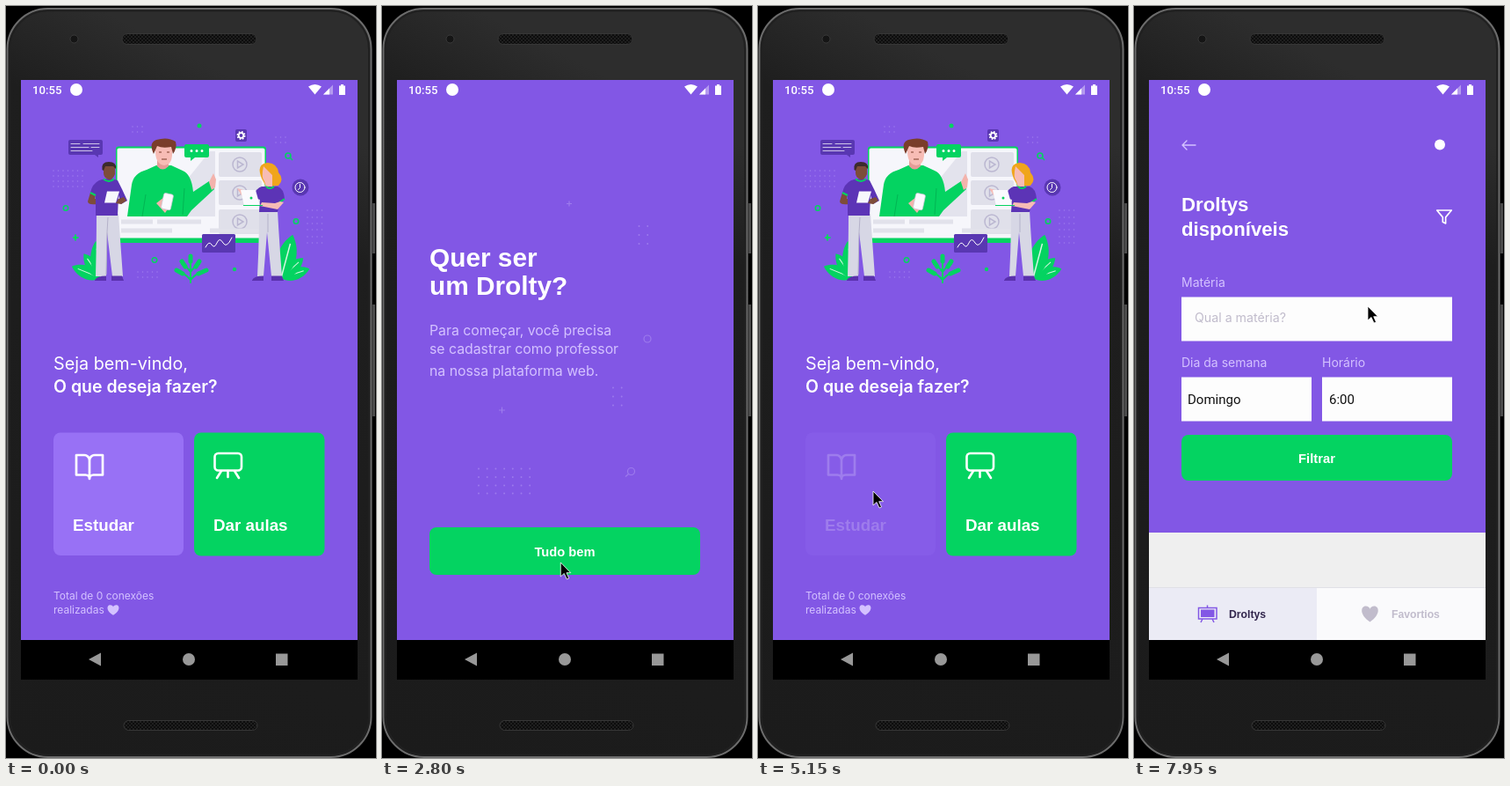
An HTML page that plays this animation: 421 px wide and 854 px high, repeating every 8 s.

```html
<!DOCTYPE html>
<html lang="pt-BR">
<head>
<meta charset="utf-8">
<title>App de aulas</title>
<style>
  html, body { margin: 0; width: 100%; height: 100%; overflow: hidden; background: #000; }
  svg { display: block; width: 421px; height: 854px; }
  text { fill: #fff; white-space: pre; }
  .pop { font-family: Inter, sans-serif; }
  .arc { font-family: "Liberation Sans", Arial, sans-serif; font-weight: 700; }
  .rob { font-family: Roboto, sans-serif; }
  .soft { fill: #d4c2ff; }
  .line { fill: none; stroke: #fff; stroke-linecap: round; stroke-linejoin: round; }
  .dots { fill: none; stroke: #9d7bed; stroke-width: 1.5; stroke-linecap: round; stroke-dasharray: 0 5.5; }
  .ring { fill: none; stroke: #04d361; stroke-width: 1.6; }
</style>
</head>
<body>
<svg viewBox="0 0 421 854">
  <defs>
    <linearGradient id="body" x1="0" y1="1" x2=".25" y2="0">
      <stop offset="0" stop-color="#1b1b1b"/><stop offset=".85" stop-color="#1e1e1e"/><stop offset="1" stop-color="#2d2d2d"/>
    </linearGradient>
    <pattern id="mesh" width="4" height="4" patternUnits="userSpaceOnUse">
      <rect width="4" height="4" fill="#0d0d0d"/><path d="M0 0h2v2h2v2h-2v-2h-2z" fill="#1f1f1f"/>
    </pattern>
    <clipPath id="stage"><rect x="17" y="106" width="383" height="614"/></clipPath>
    <clipPath id="reveal"><rect id="edge" x="17" y="106" width="383" height="614"/></clipPath>
    <g id="leaf">
      <path d="M0 0C-10-8-9-24 0-34C9-24 10-8 0 0Z" fill="#04d361"/>
      <path d="M0 0V-27" stroke="#d5f8e2" fill="none"/>
    </g>
    <g id="play">
      <rect width="49" height="28" rx="2" fill="#e0e0ea"/>
      <g fill="none" stroke="#bbb7d1" stroke-width="1.500"><circle cx="24" cy="14" r="8"/><path d="M21.500 10v8l6.500-4z"/></g>
    </g>
    <path id="heart" d="M0 9C-13 0-10-9-5-9C-2-9 0-7 0-5.500C0-7 2-9 5-9C10-9 13 0 0 9Z"/>
  </defs>

  <!-- phone -->
  <path d="M418.500 224v57M418.500 339v127" stroke="#4b4b4b" stroke-width="3"/>
  <rect x="1.500" y="3" width="414" height="850" rx="46" fill="url(#body)" stroke="#6c6c6c" stroke-width="2"/>
  <rect x="4" y="5.500" width="409" height="845" rx="43.500" fill="none" stroke="#202020" stroke-width="2"/>
  <circle cx="77.500" cy="37.500" r="4.500" fill="#151515" stroke="#3a3a3a"/>
  <g fill="url(#mesh)" stroke="#363636">
    <rect x="132" y="31.500" width="153" height="12" rx="6"/><rect x="134" y="811.500" width="152" height="11" rx="5.500"/>
  </g>
  <rect x="17" y="84" width="383" height="636" fill="#8257e5"/>
  <rect x="17" y="720" width="383" height="45"/>
  <g fill="#989898"><path d="M94 742l14-7.500v15z"/><circle cx="208" cy="742" r="7"/><rect x="307" y="735.500" width="13.500" height="13.500"/></g>

  <g clip-path="url(#stage)">
    <!-- home -->
    <g id="home">
      <path class="dots" d="M54 187h34M54 193h34M54 199h34M54 205h34M144 137h15M144 143h15M307 149h15M307 155h15M343 232h20M343 240h20M343 247h20M343 254h20M343 262h20M343 269h20M150 302h26M150 308h26"/>
      <g fill="#04d361"><circle cx="220" cy="136" r="2.500"/><circle cx="260" cy="299" r="2.200"/><path d="M76 262h2v-2.500h2v2.500h2.500v2h-2.500v2.500h-2v-2.500h-2z"/></g>
      <g class="ring"><circle cx="68" cy="229.500" r="2.700"/><circle cx="169" cy="288.500" r="2.700"/><circle cx="330" cy="244.500" r="2.700"/><circle cx="321" cy="170" r="3"/><path d="M323 172l3 3"/></g>
      <use href="#leaf" transform="translate(108 309) rotate(-68) scale(1.050)"/>
      <use href="#leaf" transform="translate(108 309) rotate(-35)"/>
      <use href="#leaf" transform="translate(108 309) rotate(-8) scale(1.250)"/>
      <use href="#leaf" transform="translate(313 309) rotate(72)"/>
      <use href="#leaf" transform="translate(313 309) rotate(48)"/>
      <use href="#leaf" transform="translate(313 309) rotate(15) scale(1.500)"/>
      <g fill="none" stroke="#04d361" stroke-linecap="round">
        <path d="M210 314V285M210 311q-8-9-15-10M210 311q8-9 17-11M210 302q-6-8-10-9M210 302q6-8 10-9" stroke-width="2"/>
        <path d="M210 290V284M201 304l-7-4M219 304l9-4M204 296l-4-6M216 296l4-6" stroke-width="5"/>
      </g>
      <!-- monitor -->
      <rect x="125" y="159.500" width="171" height="109.500" rx="3" fill="#04d361"/>
      <rect x="126.500" y="161.500" width="168" height="102" rx="2" fill="#f6f6fb"/>
      <rect x="131" y="165" width="107" height="74" fill="#e3e3ed"/>
      <path d="M131 165h101l-60 74h-41z" fill="#f6f6fb"/>
      <use href="#play" x="242" y="166"/><use href="#play" x="242" y="198"/><use href="#play" x="242" y="231"/>
      <path d="M131 245h36M172 245h50M131 255h58M232 255h59" stroke="#e2e2eb" stroke-width="5"/>
      <!-- teacher -->
      <path d="M138 239L143 203Q145 190 160 186L171 181H188L201 187Q211 191 213 211L231 199L237 208L211 232L206 239Z" fill="#04d361"/>
      <path d="M155 239l4-25M203 207l-2 30" stroke="#02b553" fill="none"/>
      <path d="M231 200l5-10 3 7 -1 9-4 3z" fill="#f3b3ac"/>
      <path d="M172 172h13v10q-7 7-13 0z" fill="#e59c98"/>
      <path d="M170 157h19v13q-1 11-9 11q-9-1-10-14z" fill="#f7bcb5"/>
      <path d="M168 168Q162 155 171 152Q184 148 193 154Q195 161 190 168L188 160Q178 162 172 159Z" fill="#7a3d2a"/>
      <path d="M174 166h3M183 166h3M177 174h6" stroke="#7a3d2a"/>
      <path d="M171 224l9-7 8 8-7 10z" fill="#f3b3ac"/>
      <rect x="178" y="213" width="11" height="18" rx="2" fill="#fafafe" stroke="#c9c9d6" stroke-width=".7" transform="rotate(12 183 222)"/>
      <path d="M205 157h24q2 0 2 2v11q0 2-2 2h-14l-5 4v-4h-5q-2 0-2-2v-11q0-2 2-2z" fill="#04d361"/>
      <path d="M211 164.500h13" stroke="#fff" stroke-width="3" stroke-linecap="round" stroke-dasharray="0 6"/>
      <!-- boy -->
      <path d="M103 236h25q2 30 5 71h-12l-6-50-1 50h-12q1-36 1-71z" fill="#d7d7e5"/>
      <path d="M116 240l-1 17-1 48" stroke="#b4b1c9" fill="none"/>
      <path d="M101 311.500q2-5 13-5v5.500h-13zM120 306.500h12l2 5.500h-14z" fill="#5a31ad"/>
      <path d="M96 212l-3 10q1 6 19 1v-5l-11 1 1-5z" fill="#7d4c3a"/>
      <path d="M106 198Q117 194 127 198L132 208L138 221L131 225L128 215L127 238H102V216L96 212Q98 202 106 198Z" fill="#5c34b6"/>
      <path d="M111 196.500q6 5 12 0M96 212l6 3" stroke="#04d361" stroke-width="2" fill="none"/>
      <path d="M111 182h13v9q-3 7-7 6-6-2-6-7z" fill="#7d4c3a"/><path d="M109.500 186Q108 177 117 177Q126 177 125 185L122 182H113L111 187Z" fill="#3c2a2c"/>
      <path d="M131 225l-6-1 3-5 6-2 3 4z" fill="#7d4c3a"/>
      <path d="M115 210.500h14l-4 13h-13z" fill="#f7f7fc"/>
      <!-- girl -->
      <path d="M288 232h21q2 38 5 75h-12l-5-50-4 50h-7q2-35 2-75z" fill="#d7d7e5"/>
      <path d="M298 236v21" stroke="#b4b1c9"/>
      <path d="M280 311.500q2-5 13-5v5.500h-13zM302 306.500h12l2 5.500h-14z" fill="#5a31ad"/>
      <path d="M291 196q-7-17 7-18 11 1 12 11 7 8 0 15l-14 1z" fill="#f0a51c"/>
      <path d="M293 182q-3 13 1 17l2 7 7-1v-13z" fill="#f7bcb5"/>
      <path d="M291 205h18q7 2 8 14l-6 6-2 9h-21l1-14-8-3q4-11 10-12z" fill="#5c34b6"/>
      <path d="M296 205q4 4 9 0M311 223l6-4" stroke="#04d361" stroke-width="2" fill="none"/>
      <path d="M312 222l4 1-7 8-20-4 2-4 15 1z" fill="#f7bcb5"/><path d="M263 207l7 2 4 9-6-3z" fill="#f7bcb5"/>
      <path d="M267 209h17l5 18h-18z" fill="#fafafe"/><path d="M270 226.500h22" stroke="#04d361"/><circle cx="279" cy="218" r="1.500" fill="#04d361"/>
      <!-- floating tiles -->
      <g fill="#5937b2"><path d="M73 152h35q2 0 2 2v13q0 2-2 2h-3v3l-4-3h-28q-2 0-2-2v-13q0-2 2-2z"/><rect x="261" y="140" width="13" height="14" rx="2"/><circle cx="335" cy="206" r="9.500"/><rect x="223" y="259" width="38" height="21" rx="1.500"/></g>
      <path class="line" d="M74 156.500h10M88 156.500h18M74 160.500h20M97 160.500h9M74 164.500h24" stroke-width="1" opacity=".7"/>
      <circle cx="267.500" cy="147" r="4" class="line" stroke-width="2" style="stroke-linecap:butt" stroke-dasharray="1.600 1.540"/><circle cx="267.500" cy="147" r="2.800" class="line" stroke-width="1.800"/>
      <g class="line" stroke-width="1"><circle cx="334.500" cy="206" r="5.500"/><path d="M334.500 202.500v4l-2 2M227 274q4-8 7-3t6-2 7 0 10-6"/></g>

      <text class="pop" x="54" y="412.500" font-size="19.800">Seja bem-vindo,</text>
      <text class="pop" x="54" y="439" font-size="19.500" font-weight="600">O que deseja fazer?</text>
      <g id="study">
        <rect x="54" y="484.500" width="148" height="139.500" rx="8" fill="#9871f5"/>
        <path class="line" stroke-width="1.800" transform="translate(77 505.500) scale(1.500)" d="M2 3h6a4 4 0 0 1 4 4v14a3 3 0 0 0-3-3H2zM22 3h-6a4 4 0 0 0-4 4v14a3 3 0 0 1 3-3h7z"/>
        <text class="arc" x="76" y="596" font-size="18.800">Estudar</text>
      </g>
      <rect x="214" y="484.500" width="148.500" height="140" rx="8" fill="#04d361"/>
      <g class="line" stroke-width="2.600"><rect x="237.500" y="508" width="30.500" height="19.500" rx="4"/><path d="M245 528l-5 8M252.500 528v7M260 528l5 8"/></g>
      <text class="arc" x="236" y="596" font-size="18.800">Dar aulas</text>
      <g class="pop" font-size="12"><text class="soft" x="54" y="674">Total de 0 conexões</text><text class="soft" x="54" y="690">realizadas</text></g>
      <use href="#heart" class="soft" transform="translate(122 686) scale(.7 .65)"/>
    </g>
    <rect id="shade" x="17" y="106" width="383" height="614"/>

    <!-- card revealed from below -->
    <g clip-path="url(#reveal)"><g id="card">
      <g id="teach">
        <rect x="17" y="106" width="383" height="650" fill="#8257e5"/>
        <g id="deco">
          <path class="dots" style="stroke-width:1.900;stroke-dasharray:0 9.700" d="M292.500 250h11M292.500 260h11M292.500 270h11M263 433.500h11M263 443.500h11M263 453.500h11M110 525.500h59M110 535h59M110 544.500h59M110 553.500h59"/>
          <g fill="none" stroke="#9d7bed" stroke-width="1.200"><path d="M210 224.500h6M213 221.500v6M133 459h7M136.500 455.500v7"/><circle cx="302" cy="378" r="4"/><circle cx="283.500" cy="528.500" r="4"/><path d="M280.500 531.500l-3.500 3"/></g>
        </g>
        <g class="arc" font-size="29.800"><text x="54" y="296">Quer ser</text><text x="54" y="328.300">um Drolty?</text></g>
        <g class="pop" font-size="15.800"><text class="soft" x="54" y="374">Para começar, você precisa</text><text class="soft" x="54" y="395">se cadastrar como professor</text><text class="soft" x="54" y="419.500">na nossa plataforma web.</text></g>
        <g id="ok">
          <rect x="54" y="592" width="308" height="54" rx="8" fill="#04d361"/>
          <text class="arc" x="208" y="624.500" font-size="14.700" text-anchor="middle">Tudo bem</text>
        </g>
      </g>
      <g id="list">
        <rect x="17" y="106" width="383" height="650" fill="#efefef"/>
        <rect id="head" x="17" y="106" width="383" height="236" fill="#8257e5"/>
        <path class="line" stroke-width="1.400" style="stroke:#d4c2ff" d="M70 158H55l5-5M55 158l5 5"/>
        <circle cx="348" cy="157.500" r="6" fill="#fff"/>
        <g class="arc" font-size="22.200"><text x="54" y="233">Droltys</text><text x="54" y="260.500">disponíveis</text></g>
        <path id="funnel" class="line" stroke-width="2" transform="translate(343 229.500) scale(.83)" d="M22 3H2l8 9.460V19l4 2v-8.540z"/>
        <g id="form">
          <g class="pop" font-size="14"><text class="soft" x="54" y="318.500">Matéria</text><text class="soft" x="54" y="409.500">Dia da semana</text><text class="soft" x="214" y="409.500">Horário</text></g>
          <path d="M54 330.500h308v50H54zM54 421.500h148v50H54zM214 421.500h148v50H214z" fill="#fdfdfd"/>
          <text class="pop" x="69" y="359" font-size="14.200" style="fill:#c1bccc">Qual a matéria?</text>
          <g class="rob" font-size="15"><text x="61" y="452" style="fill:#111">Domingo</text><text x="222" y="452" style="fill:#111">6:00</text></g>
          <rect x="54" y="487" width="308" height="52" rx="8" fill="#04d361"/>
          <text class="arc" x="208" y="518.500" font-size="14.800" text-anchor="middle">Filtrar</text>
        </g>
        <rect x="17" y="660" width="191" height="60" fill="#ebebf5"/><rect x="208" y="660" width="192" height="60" fill="#fafafc"/>
        <path d="M17 660.500h383" stroke="#e0e0e6"/>
        <g fill="none" stroke="#8257e5" stroke-width="1.500"><path d="M73.500 683.500h20.500v12.500H73.500zM83.500 683v-2.500M78 696l-2 4M89 696l2 4"/></g>
        <rect x="76" y="685.500" width="15.500" height="8.500" fill="#8257e5"/>
        <use href="#heart" x="268.500" y="690.500" fill="#c1bccc"/>
        <g class="arc" font-size="12.200"><text x="108" y="695" style="fill:#32264d">Droltys</text><text x="293" y="695" style="fill:#c1bccc">Favortios</text></g>
      </g>
    </g></g>
  </g>

  <!-- status bar -->
  <text class="rob" x="30" y="100" font-size="13.200" font-weight="500">10:55</text>
  <g fill="#fff">
    <circle cx="80" cy="95" r="7"/><path d="M344 91.500q7.500-5 15 0l-7.500 9z"/>
    <path d="M372 89.500v11h-11z" opacity=".4"/><path d="M368 93.500v7h-7z"/>
    <path d="M379 90.500h2v-1.500h3v1.500h2v10.500h-7z"/>
  </g>
  <path id="cursor" d="M0 0V16L4 12.500L7 19L9.500 18L6.700 11.700H11.500Z" stroke="#fff" stroke-width=".8"/>
</svg>
<script>
const $ = id => document.getElementById(id);
const LOOP = 8000, HEIGHT = 614;
const clamp = v => Math.min(1, Math.max(0, v));
const show = (id, on) => $(id).setAttribute('display', on ? 'inline' : 'none');
const move = (id, x, y) => $(id).setAttribute('transform', `translate(${x} ${y})`);

// each child blends on its own, so a label stays visible over its faded button
function fade(id, v) {
  $(id).setAttribute('fill-opacity', v);
  $(id).setAttribute('stroke-opacity', v);
}

// [ms, x, y]
const path = [
  [1000, 409, 819], [1200, 345, 655], [1450, 304, 561], [2050, 304, 561], [2400, 215, 639],
  [2500, 210, 637], [2700, 210, 637], [3000, 190, 622], [3200, 190, 622], [3250, 189, 622],
  [3950, 189, 622], [4400, 150, 575], [4750, 131, 551], [5850, 131, 551], [6200, 248, 479],
  [6500, 365, 300], [6750, 350, 236], [6950, 350, 236], [7200, 350, 243], [7350, 350, 243],
  [7700, 295, 318], [7950, 266, 341]
];

function pointer(t) {
  const i = path.findIndex(k => k[0] > t);
  if (i < 0) return path[path.length - 1].slice(1);
  if (!i) return null;
  const a = path[i - 1], b = path[i], f = (t - a[0]) / (b[0] - a[0]);
  return [1, 2].map(n => a[n] + (b[n] - a[n]) * f);
}

// cubic-bezier(.20833, .82, .25, 1) over 425 ms
function slide(ms) {
  const x = clamp(ms / 425);
  const curve = (s, a, b) => 3 * (1 - s) ** 2 * s * a + 3 * (1 - s) * s * s * b + s ** 3;
  let lo = 0, hi = 1;
  for (let i = 0; i < 20; i++) {
    const mid = (lo + hi) / 2;
    if (curve(mid, .20833, .25) < x) lo = mid; else hi = mid;
  }
  return curve(hi, .82, 1) * (x > 0);
}

function pressed(t, down, up, low = .2) {
  if (t < down) return 1;
  const f = clamp((t - up) / 250);
  return low + (1 - low) * (f < .5 ? 2 * f * f : 1 - 2 * (1 - f) ** 2);
}

function draw(t) {
  const teaching = t < 3850;
  const p = teaching ? Math.min(slide(t - 1600), 1 - slide(t - 3763)) : slide(t - 5400);
  $('edge').setAttribute('y', Math.round(106 + HEIGHT * (1 - p)));
  move('home', 0, -.02 * HEIGHT * p);
  move('card', 0, .041 * HEIGHT * (1 - p));
  fade('shade', .1 * clamp(p / .36));
  show('teach', teaching);
  show('list', !teaching);
  fade('deco', clamp((t - 1650) / 300));
  fade('study', pressed(t, 5150, 5400));
  fade('ok', pressed(t, 3600, 3750));
  fade('funnel', pressed(t, 7000, 7100, .3));
  const open = t >= 7350;
  show('form', open);
  $('head').setAttribute('height', open ? 492 : 236);
  const at = pointer(t);
  show('cursor', at);
  if (at) move('cursor', ...at);
}

const start = performance.now();
(function tick() {
  draw((performance.now() - start) % LOOP);
  requestAnimationFrame(tick);
})();
</script>
</body>
</html>
```
